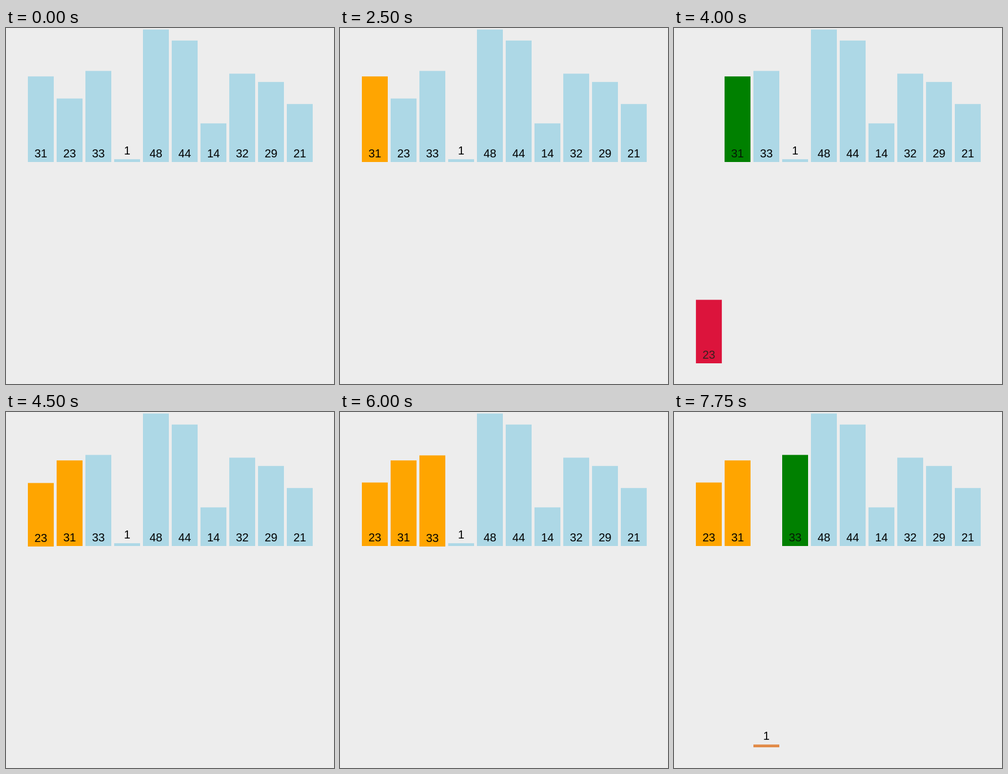
These frames come from a looping animation (570x619 px, 8000 ms). An HTML page:

```html
<!DOCTYPE html>
<html lang="en">
<head>
<meta charset="utf-8">
<title>Insertion sort</title>
<style>
  html, body { margin: 0; width: 100%; height: 100%; overflow: hidden; background: #ededed; }
  svg { display: block; width: 570px; height: 619px; }
  text { font: 20px "Liberation Sans", Arial, sans-serif; text-anchor: middle; }
</style>
</head>
<body>
<svg id="stage" viewBox="0 0 570 619"></svg>
<script>
const LOOP = 8000, TICK = 250;
const FIRST = 2253, GAP = 500, MOVE = 270;
const BASE = 233, DROP = 350, PITCH = 50, LEFT = 38, WIDTH = 45, UNIT = 4.8;

const PLAIN = [173, 216, 230], SORTED = [255, 165, 0];
const COMPARED = [0, 128, 0], KEY = [220, 20, 60], THIN_KEY = [226, 139, 72];
const INK = new Map([[COMPARED, '#061806'], [KEY, '#38201f']]);

const values = [31, 23, 33, 1, 48, 44, 14, 32, 29, 21];

// Each step lists the bars it changes, by value.
const extract = (v, color = KEY) => ({ [v]: { drop: DROP, color } });
const compare = v => ({ [v]: { color: COMPARED } });
const shift = (v, key, slot) => ({ [v]: { slot: slot + 1 }, [key]: { slot } });
const insert = (key, v) => ({ [key]: { drop: 0, color: SORTED }, [v]: { color: SORTED } });

const steps = [
  { 31: { color: SORTED } },
  extract(23), compare(31), shift(31, 23, 0), insert(23, 31),
  extract(33), compare(31), insert(33, 31),
  extract(1, THIN_KEY), compare(33), shift(33, 1, 2)
];

const poses = [Object.fromEntries(values.map((v, slot) => [v, { slot, drop: 0, color: PLAIN }]))];
for (const step of steps) {
  const next = { ...poses[poses.length - 1] };
  for (const v in step) next[v] = { ...next[v], ...step[v] };
  poses.push(next);
}

const stage = document.getElementById('stage');
function add(parent, tag, attrs) {
  const el = document.createElementNS('http://www.w3.org/2000/svg', tag);
  for (const name in attrs) el.setAttribute(name, attrs[name]);
  return parent.appendChild(el);
}

const bars = values.map(v => {
  const group = add(stage, 'g', {});
  const height = v * UNIT;
  const rect = add(group, 'rect', { x: 0, y: BASE - height, width: WIDTH, height });
  const label = add(group, 'text', { x: WIDTH / 2, y: v < 5 ? 220.4 : 225 });
  label.textContent = v;
  return { v, group, rect, label };
});

const ease = p => p < .5 ? 4 * p ** 3 : 1 - 4 * (1 - p) ** 3;
const mix = (a, b, p) => a + (b - a) * p;

function draw(time) {
  const since = time - FIRST;
  const index = Math.min(Math.floor(since / GAP), steps.length - 1);
  const i = Math.max(index, 0);
  const p = ease(Math.min(Math.max((since - i * GAP) / MOVE, 0), 1));
  for (const { v, group, rect, label } of bars) {
    const a = poses[i][v], b = poses[i + 1][v];
    const x = LEFT + PITCH * mix(a.slot, b.slot, p);
    group.setAttribute('transform', `translate(${x} ${mix(a.drop, b.drop, p)})`);
    rect.setAttribute('fill', `rgb(${a.color.map((c, n) => Math.round(mix(c, b.color[n], p)))})`);
    label.setAttribute('fill', INK.get(p < .5 ? a.color : b.color) || '#000');
  }
}

const start = performance.now();
function frame() {
  const time = (performance.now() - start) % LOOP;
  draw(Math.floor(time / TICK) * TICK);
  requestAnimationFrame(frame);
}
frame();
</script>
</body>
</html>
```
